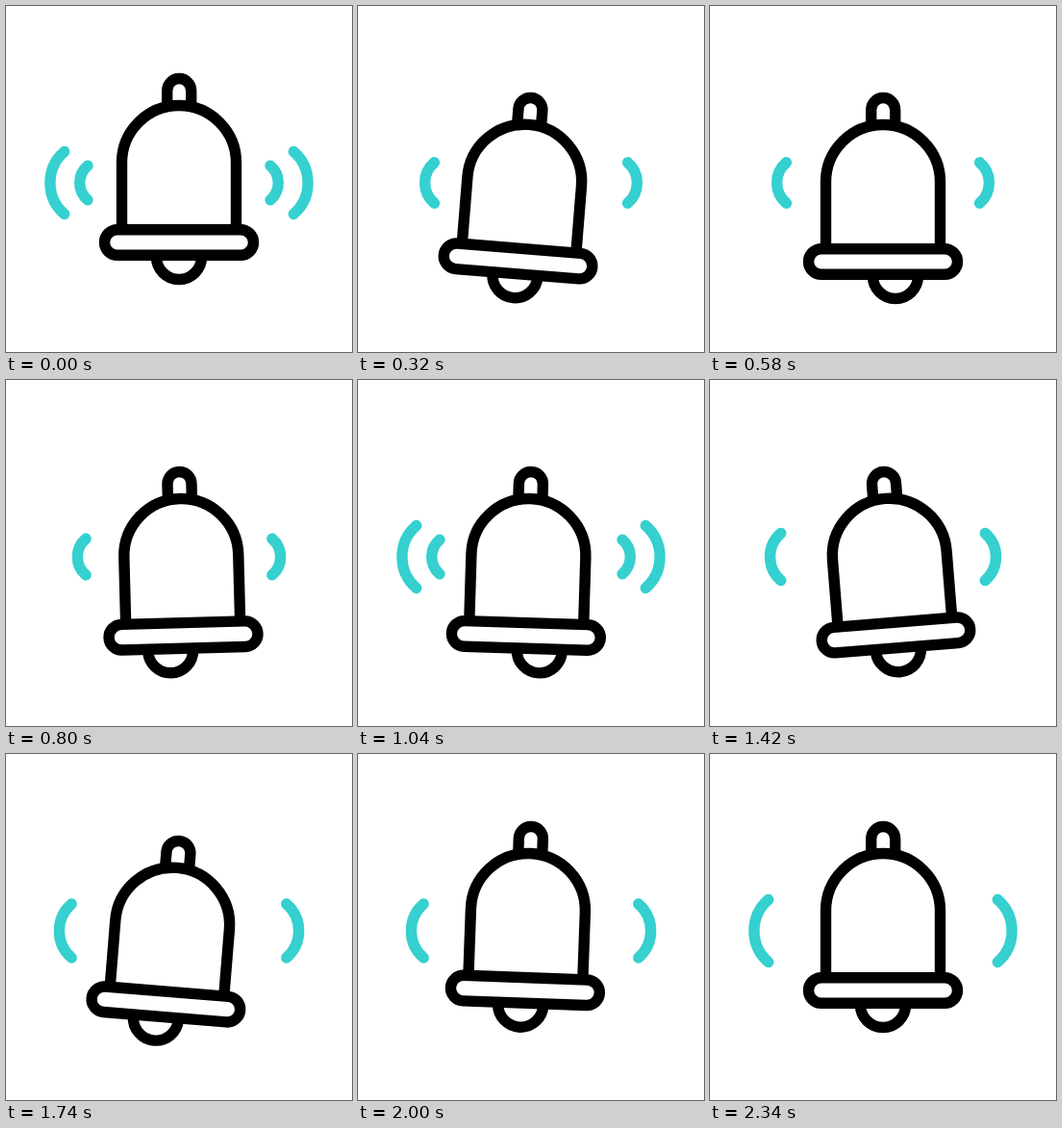
An HTML page that plays this animation: 360x360 px, repeating every 2.4 s.

```html
<!DOCTYPE html>
<html lang="en">
<head>
<meta charset="utf-8">
<title>Ringing bell</title>
<style>
  html, body { margin: 0; width: 100%; height: 100%; overflow: hidden; background: #fff; }
  svg { display: block; width: 100%; height: 100%; }
  path, rect { fill: none; stroke-width: 11.4; stroke-linecap: round; stroke-linejoin: round; }
  #bell { stroke: #000; }
  #bell rect { fill: #fff; }
  #waves { stroke: #35d0cf; }
</style>
</head>
<body>
<svg viewBox="0 0 360 360">
  <g id="waves">
    <path id="near"/>
    <path id="far"/>
  </g>
  <g id="bell">
    <path id="clapper" d="M156.5 261a23.5 23.5 0 0 0 47 0"/>
    <path d="M167.7 101V88a12.5 12.5 0 0 1 25 0V101"/>
    <path d="M120.5 232V163a59.5 59.5 0 0 1 119 0V232"/>
    <rect x="102.5" y="232.7" width="155" height="26.6" rx="13.3"/>
  </g>
</svg>
<script>
const LOOP = 2400, STEP = 20, WAVE = 260, LAST = 2340;

// [time, value] pairs, eased with a half cosine
const swing = [[0, 0], [320, 4.6], [500, -4.6], [660, 4.6], [890, -4.6],
  [1130, 4.6], [1420, -4.6], [1700, 4.7], [2260, 0]];
const lag = [[0, 0], [200, 12], [430, -14], [585, 13], [785, -14],
  [1030, 14.5], [1275, -14], [1550, 14], [1790, -12], [2140, 0]];
const drop = [[0, 0], [300, 20], [1620, 20], [1980, 0]];

const $ = id => document.getElementById(id);
const mix = (a, b, p) => a + (b - a) * p;

function at(keys, t) {
  const i = keys.findIndex(k => k[0] > t);
  if (i < 0) return keys[keys.length - 1][1];
  const [t0, a] = keys[i - 1], [t1, b] = keys[i];
  return mix(a, b, (1 - Math.cos(Math.PI * (t - t0) / (t1 - t0))) / 2);
}

// Mirrored pair of arcs, p = 0 close to the bell, 1 fully spread
function arcs(p) {
  const x = mix(85, 60.7, p), h = mix(17.8, 32.5, p);
  const sag = x - mix(76.7, 45.9, p);
  const r = (h * h + sag * sag) / (2 * sag);
  const side = (sx, sweep) =>
    `M${sx} ${184 - h}A${r} ${r} 0 0 ${sweep} ${sx} ${184 + h}`;
  return side(x, 0) + side(360 - x, 1);
}

function draw(now) {
  const t = Math.floor(now % LOOP / STEP) * STEP;
  const phase = t % WAVE;

  $("bell").setAttribute("transform",
    `translate(0 ${at(drop, t)}) rotate(${at(swing, t)} 180 78)`);
  $("clapper").setAttribute("transform", `translate(${at(lag, t)} 0)`);

  $("near").setAttribute("d", t < LAST ? arcs(phase / WAVE) : "");
  $("far").setAttribute("d", t >= LAST || phase === 0 ? arcs(1) : "");
}

const start = performance.now();
function tick() {
  draw(performance.now() - start);
  requestAnimationFrame(tick);
}
tick();
</script>
</body>
</html>
```
